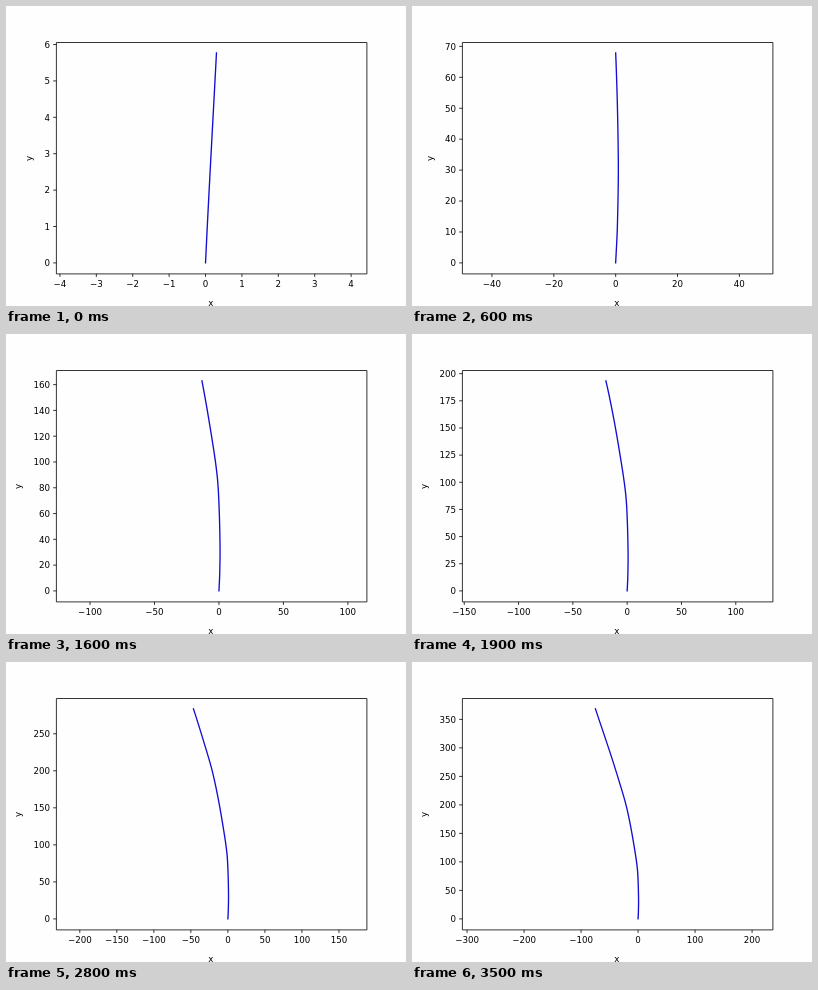
These frames come from a looping animation (400 px wide and 300 px high, 3.6 s). An HTML page with a canvas:

```html
<!DOCTYPE html>
<html lang="en">
<head>
<meta charset="utf-8">
<title>Path plot</title>
<style>
html, body { margin: 0; width: 100%; height: 100%; overflow: hidden; background: #fefefe; }
canvas { display: block; width: 400px; height: 300px; }
</style>
</head>
<body>
<canvas id="plot" width="400" height="300"></canvas>
<script>
const ctx = document.getElementById('plot').getContext('2d');
const STEP_MS = 100, STEPS = 36;
const area = { l: 50, w: 310, h: 231, bottom: 267.4 };
const frame = { l: 50.4, t: 36.5, r: 360.9, b: 267.9 };
const MARGIN = 0.05;

// Smooth curve through a few [u, v] points
function spline(pts) {
  const n = pts.length - 1;
  const slope = i => {
    const a = pts[Math.max(i - 1, 0)], b = pts[Math.min(i + 1, n)];
    return (b[1] - a[1]) / (b[0] - a[0]);
  };
  return u => {
    let i = 0;
    while (i < n - 1 && u > pts[i + 1][0]) i++;
    const [u0, v0] = pts[i], [u1, v1] = pts[i + 1];
    const d = u1 - u0, s = (u - u0) / d, r = 1 - s;
    return r * r * ((1 + 2 * s) * v0 + s * d * slope(i)) +
           s * s * ((1 + 2 * r) * v1 - r * d * slope(i + 1));
  };
}

// Distance travelled in y per step, and the sideways drift at each y
const reach = spline([[0, 5.77], [1, 16.5], [6, 67.9], [11, 119.15],
  [16, 162.9], [23, 235], [28, 283.6], [35, 368.4]]);
const drift = spline([[0, 0], [12, 0.56], [34, 0.85], [68, 0], [90, -1.45],
  [119.2, -5.6], [163, -13.2], [200, -21.2], [235, -31.3],
  [284, -46.6], [368.4, -74.8]]);

function tickStep(range) {
  const raw = range / 9;
  const base = 10 ** Math.floor(Math.log10(raw));
  return base * [1, 2, 2.5, 5, 10].find(k => k * base >= raw - 1e-9);
}

function ticks(min, max) {
  const step = tickStep(max - min);
  const digits = step % 1 ? 1 : 0;
  const list = [];
  for (let k = Math.ceil(min / step); k * step <= max; k++) {
    const v = k * step;
    list.push({ v, label: (v < 0 ? '\u2212' : '') + Math.abs(v).toFixed(digits) });
  }
  return list;
}

function segment(x0, y0, x1, y1) {
  ctx.beginPath();
  ctx.moveTo(x0, y0);
  ctx.lineTo(x1, y1);
  ctx.stroke();
}

function draw(step) {
  const top = reach(step);
  const path = [];
  for (let i = 0; i <= 120; i++) {
    const y = top * i / 120;
    path.push([drift(y), y]);
  }
  const xs = path.map(p => p[0]);
  const mid = (Math.min(...xs) + Math.max(...xs)) / 2;
  const scale = area.h / (top * (1 + 2 * MARGIN));
  const half = area.w / 2 / scale;
  const centre = area.l + area.w / 2;
  const px = x => centre + (x - mid) * scale;
  const py = y => area.bottom - (y + top * MARGIN) * scale;

  ctx.fillStyle = '#fefefe';
  ctx.fillRect(0, 0, 400, 300);

  ctx.strokeStyle = '#140ed2';
  ctx.lineWidth = 1.35;
  ctx.lineCap = 'square';
  ctx.lineJoin = 'round';
  ctx.beginPath();
  for (const [x, y] of path) ctx.lineTo(px(x), py(y));
  ctx.stroke();

  ctx.strokeStyle = ctx.fillStyle = '#000';
  ctx.lineWidth = 0.8;
  ctx.lineCap = 'butt';
  ctx.strokeRect(frame.l, frame.t, frame.r - frame.l, frame.b - frame.t);

  ctx.font = '8.68px "DejaVu Sans", sans-serif';
  ctx.textAlign = 'center';
  for (const { v, label } of ticks(mid - half, mid + half)) {
    segment(px(v), frame.b, px(v), frame.b + 3);
    ctx.fillText(label, px(v), 280.9);
  }
  ctx.fillText('x', centre - 0.3, 299.6);

  ctx.textAlign = 'right';
  let widest = 0;
  for (const { v, label } of ticks(-top * MARGIN, top * (1 + MARGIN))) {
    segment(frame.l, py(v), frame.l - 3.2, py(v));
    ctx.fillText(label, 44.1, py(v) + 3.3);
    widest = Math.max(widest, ctx.measureText(label).width);
  }

  ctx.save();
  ctx.translate(31.9 - widest, 152.5);
  ctx.rotate(-Math.PI / 2);
  ctx.textAlign = 'center';
  ctx.fillText('y', 0, 0);
  ctx.restore();
}

const start = performance.now();
function tick(now) {
  draw(Math.floor(Math.max(now - start, 0) / STEP_MS) % STEPS);
  requestAnimationFrame(tick);
}
draw(0);
requestAnimationFrame(tick);
</script>
</body>
</html>
```
